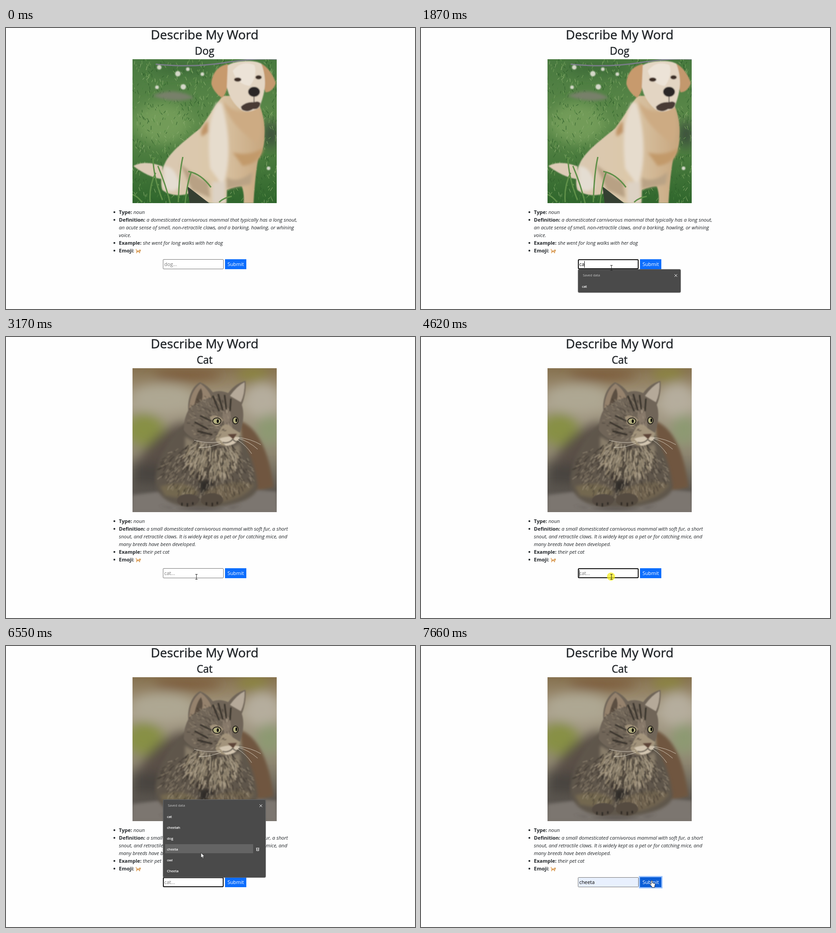
An HTML page that plays this animation: 902 by 621 pixels, repeating every 8000 ms.

```html
<!DOCTYPE html>
<html lang="en">
<head>
<meta charset="utf-8">
<title>Describe My Word</title>
<style>
html,body{margin:0;width:100%;height:100%;overflow:hidden;background:#fefefe}
body{position:relative;font:11.03px/17px "Open Sans","Noto Sans",sans-serif;color:#212529}
h1,h2,ul,.abs,.photo,.panel,.rows,.hover{position:absolute;margin:0}
h1,h2{left:0;width:876px;text-align:center;font-weight:400;white-space:nowrap;-webkit-text-stroke:.5px #212529}
h1{top:-3px;font-size:27.9px;line-height:34px}
h2{top:37px;font-size:22.8px;line-height:27px}
.photo{left:279px;top:69px;width:318px;height:318px}
ul{left:249px;top:398px;padding:0;list-style:none;white-space:nowrap}
li{position:relative}
li::before{content:"";position:absolute;left:-12.5px;top:7px;width:4px;height:4px;border-radius:50%;background:#212529}
.emoji{width:12px;height:12px;vertical-align:-2.5px}

.t{animation:8s step-end infinite}
.dog{animation-name:dog}
.cat{animation-name:cat}
@keyframes dog{0%{opacity:1}39.6%{opacity:0}}
@keyframes cat{0%{opacity:0}39.6%{opacity:1}}

/* form */
.input,.btn{font-size:10.9px}
.input{left:346px;top:511px;width:132px;height:20px;border:1px solid #767676;border-radius:2px;background:#fff;color:#000;overflow:hidden}
.ring{left:346px;top:511px;width:130px;height:18px;border:2px solid #101010;border-radius:3px;animation-name:ring}
@keyframes ring{0%{opacity:0}12.2%{opacity:1}39.6%{opacity:0}57.7%{opacity:1}94.8%{opacity:0}}
.strip{animation-name:type}
.strip div{height:20px;line-height:20px;padding-left:2px;white-space:nowrap}
.strip .hint{color:#757575}
.strip .filled{background:#e8f0fe}
@keyframes type{
  0%{transform:none}20.8%{transform:translateY(-20px)}23.3%{transform:translateY(-40px)}
  26.7%{transform:translateY(-60px)}39.6%{transform:translateY(-80px)}82.7%{transform:translateY(-100px)}
}
.caret{display:inline-block;width:1px;height:15px;margin-right:-1px;vertical-align:-3.5px;background:#111;animation-name:blink}
@keyframes blink{
  0%{opacity:0}12.2%{opacity:1}33.4%{opacity:0}57.7%{opacity:1}64.1%{opacity:0}
  70.8%{opacity:1}77.5%{opacity:0}83.6%{opacity:1}90.2%{opacity:0}
}
.typo{text-decoration:underline wavy #e33 .8px;text-underline-offset:1px;animation-name:typo}
@keyframes typo{0%{text-decoration-color:#e33}94.8%{text-decoration-color:transparent}}
.btn{left:483px;top:511px;width:47px;height:22px;line-height:22px;text-align:center;color:#fff;background:#0d6efd;animation-name:press}
@keyframes press{
  0%{background:#0d6efd;box-shadow:none}
  91.3%{background:#0b5ed7;box-shadow:none}
  94.8%{background:#0b5ed7;box-shadow:0 0 0 2.6px rgba(49,132,253,.5)}
}

/* suggestions */
.panel{left:346px;width:225px;border:1px solid #686868;border-radius:3px;background:#4a4a4a;color:#fff;box-shadow:0 0 2px rgba(0,0,0,.25);opacity:0}
.up{top:339px;height:171px;transform-origin:50% 56%}
.down{top:533px;height:50px;animation-name:down}
.panel small{position:absolute;left:10px;top:4px;font-size:7.4px;color:#c8c8c8}
.panel svg{position:absolute;left:210.5px;top:8.5px;width:8px;height:8px;fill:none;stroke:#eee}
.panel .bin{top:105px;left:204px;opacity:0;animation-name:bin}
.rows{left:8px;top:25px;font-size:7.8px;line-height:24px;white-space:pre-line;-webkit-text-stroke:.2px #fff}
.hover{left:4px;top:98px;width:194px;height:20px;background:rgba(255,255,255,.14);animation-name:hover}
.first{animation-name:first}
.second{animation-name:second}
.all{animation-name:all}
.some{animation-name:some}
@keyframes first{0%{opacity:0}15.8%{opacity:.4}16.7%{opacity:1}23.3%{opacity:0}}
@keyframes all{0%{opacity:1}20.8%{opacity:0}}
@keyframes some{0%{opacity:0}20.8%{opacity:1}}
@keyframes down{0%{opacity:0}23.3%{opacity:1}27.6%{opacity:.66}28.4%{opacity:.34}29.3%{opacity:0}}
@keyframes second{
  0%{opacity:0}58.6%{opacity:.5}59.3%{opacity:1;transform:none;clip-path:none}
  84.4%{opacity:.34;transform:scale(.969);clip-path:inset(48px -2px -2px)}85.3%{opacity:0}
}
@keyframes hover{
  0%{opacity:0;transform:translateY(48px)}77.5%{opacity:1;transform:translateY(48px)}
  79.3%{opacity:1;transform:translateY(24px)}81.8%{opacity:1;transform:none}
}
@keyframes bin{0%{opacity:0}81.8%{opacity:1}}

/* pointer */
.pointer{left:0;top:0;width:1px;height:1px;overflow:visible;animation-name:move}
.arrow{animation-name:arrow}
.beam{animation-name:beam}
.hand{animation-name:hand}
.glow{animation-name:glow}
@keyframes move{
  0%{transform:translate(571px,602px)}
  5.3%{transform:translate(571px,602px);animation-timing-function:steps(4)}
  8.8%{transform:translate(470px,552px);animation-timing-function:steps(4)}
  12.2%{transform:translate(420px,530px)}
  75.8%{transform:translate(422px,519px);animation-timing-function:steps(8)}
  82.7%{transform:translate(431px,448px);animation-timing-function:steps(2)}
  84.4%{transform:translate(431px,466px)}
  85.3%{transform:translate(431px,484px)}
  86.2%{transform:translate(436px,487px);animation-timing-function:steps(7)}
  92.2%{transform:translate(509px,518px)}
}
@keyframes arrow{0%{opacity:0}5.3%{opacity:1}11.3%{opacity:0}31.8%{opacity:1}39.6%{opacity:0}76.7%{opacity:1}91.3%{opacity:0}}
@keyframes beam{0%{opacity:0}11.3%{opacity:1}31.8%{opacity:0}39.6%{opacity:1}76.7%{opacity:0}}
@keyframes hand{0%{opacity:0}91.3%{opacity:1}}
@keyframes glow{0%{opacity:0}15%{opacity:1}18.3%{opacity:0}57.7%{opacity:1}59.3%{opacity:0}82.7%{opacity:1}83.6%{opacity:0}94.2%{opacity:1}95.6%{opacity:0}}
</style>
</head>
<body>
<svg width="0" height="0" class="abs">
  <defs>
    <filter id="soft" x="-30%" y="-30%" width="160%" height="160%"><feGaussianBlur stdDeviation="12"/></filter>
    <filter id="fuzz" x="-20%" y="-20%" width="140%" height="140%"><feGaussianBlur stdDeviation="3"/></filter>
    <filter id="edge"><feGaussianBlur stdDeviation=".8"/></filter>
    <linearGradient id="lawn" x2="0" y2="1"><stop offset="0" stop-color="#48793f"/><stop offset=".45" stop-color="#5d8a4a"/><stop offset="1" stop-color="#2f662c"/></linearGradient>
    <linearGradient id="coat" x1="0" x2="1"><stop offset="0" stop-color="#d9c9b2"/><stop offset=".5" stop-color="#dcc8aa"/><stop offset="1" stop-color="#c7a67e"/></linearGradient>
    <linearGradient id="yard" x2="0" y2="1"><stop offset="0" stop-color="#86714f"/><stop offset=".25" stop-color="#a99f8a"/><stop offset=".6" stop-color="#8d8570"/><stop offset=".85" stop-color="#5b5650"/><stop offset="1" stop-color="#77716b"/></linearGradient>
    <symbol id="pet" viewBox="0 0 14 13"><path d="M2 1Q0 0 0 3Q1 5 2 5.500L1 12H3L4.500 9H8.500L9 12H11L11.500 8Q14 7 13 4V2L11.500 3H10L8.500 2V5H4Q2 4 2 1Z" fill="#e6b172"/><path d="M3 6L4 8M6 5.500V8M10 9L9 11" stroke="#b0713a"/><path d="M10.300 4.500H11M12 4.500H12.600" stroke="#432"/></symbol>
  </defs>
</svg>

<h1>Describe My Word</h1>

<section class="t dog">
  <h2>Dog</h2>
  <svg class="photo" viewBox="279 69 318 318">
    <path fill="url(#lawn)" d="M279 69h318v318H279z"/>
    <g filter="url(#soft)"><ellipse cx="345" cy="210" rx="60" ry="45" fill="#729b58"/><ellipse cx="585" cy="235" rx="16" ry="30" fill="#37493b"/><ellipse cx="390" cy="90" rx="70" ry="12" fill="#3d6b37"/></g>
    <g id="grass" fill="none" opacity=".8"></g>
    <path d="M323 150q45-22 92 4q-40 14-92-4z" fill="#78806b" filter="url(#fuzz)"/>
    <path d="M330 80Q410 88 480 77T597 69" fill="none" stroke="#777c85" stroke-width="3"/>
    <g fill="#d5d8c9" filter="url(#edge)"><circle cx="338" cy="87" r="5"/><circle cx="379" cy="101" r="6"/><circle cx="391" cy="130" r="6"/><circle cx="401" cy="91" r="4"/><circle cx="433" cy="102" r="4"/><circle cx="333" cy="131" r="4"/><circle cx="579" cy="310" r="4"/></g>
    <g filter="url(#edge)">
      <path d="M281 305C300 294 325 298 345 306L345 334C325 332 300 320 281 305Z" fill="#dccbb6"/>
      <path d="M478 150C460 172 442 205 428 222C400 245 362 272 350 300C342 320 340 345 345 358C365 374 400 372 410 360C425 372 440 385 450 387H486L487 358C500 352 515 348 520 350Q526 366 524 387H546C548 350 552 310 556 290C568 270 570 255 570 240C572 215 568 190 556 165L500 150Z" fill="url(#coat)"/>
    </g>
    <g filter="url(#fuzz)">
      <path d="M479 160C505 200 550 180 557 175C566 210 563 240 552 254C520 230 490 205 479 160Z" fill="#cdab83"/>
      <path d="M465 165C445 200 445 260 450 310L478 350C500 290 490 210 475 165Z" fill="#e6dccd"/>
      <path d="M445 205Q425 225 432 240L446 230Z" fill="#c09468"/>
      <path d="M500 275Q535 285 568 265Q560 300 522 305Z" fill="#c29a6b"/>
      <path d="M348 305Q375 305 384 350Q365 370 348 352Z" fill="#e4ddd2"/>
      <path d="M384 300Q420 330 446 340L450 375L410 358Z" fill="#b8a184"/>
      <path d="M487 330Q510 345 544 318L540 345L487 356Z" fill="#b9a385"/>
      <path d="M455 340H484V387H455Z" fill="#ddd2c4"/>
    </g>
    <path d="M400 350L448 387H405Z" fill="#353f32"/>
    <g filter="url(#edge)">
      <path d="M489 80C462 84 453 108 453 124C456 136 466 148 476 154C488 146 489 125 495 86Z" fill="#c79a6d"/>
      <path d="M560 77C578 86 590 104 595 122C590 138 578 143 572 142C566 122 568 98 560 77Z" fill="#c3986d"/>
      <path d="M489 83C500 72 550 69 563 79C570 95 573 118 570 135C568 152 562 166 559 176C545 184 530 188 520 182C505 172 490 150 487 130Z" fill="#e3d5c3"/>
      <path d="M500 95Q520 70 548 82Q555 105 538 128Q510 125 500 95Z" fill="#ece3d7"/>
      <path d="M518 174Q530 162 547 164Q556 160 561 166Q559 181 545 179Q532 188 520 180Z" fill="#493a36"/>
      <ellipse cx="547" cy="141" rx="13" ry="11" fill="#292728"/>
      <path d="M547 151V164" stroke="#3b3030" stroke-width="2"/>
      <ellipse cx="511" cy="114" rx="8" ry="4.500" fill="#3d2e27"/><ellipse cx="557" cy="109" rx="7" ry="4.500" fill="#3d2e27"/>
    </g>
    <path d="M380 385Q382 320 390 285M345 380Q325 330 324 285M452 352Q430 322 402 317M335 305Q352 345 362 387M300 385Q290 372 279 368M395 387Q400 340 408 320M470 385Q480 375 498 372M318 385Q315 350 330 320" fill="none" stroke="#5f9049" stroke-width="3"/>
  </svg>
  <ul>
    <li><b>Type:</b> <i>noun</i></li>
    <li><b>Definition:</b> <i>a domesticated carnivorous mammal that typically has a long snout,<br>an acute sense of smell, non-retractile claws, and a barking, howling, or whining<br>voice.</i></li>
    <li><b>Example:</b> <i>she went for long walks with her dog</i></li>
    <li><b>Emoji:</b> <svg class="emoji"><use href="#pet"/></svg></li>
  </ul>
</section>

<section class="t cat">
  <h2>Cat</h2>
  <svg class="photo" viewBox="279 69 318 318">
    <path fill="url(#yard)" d="M279 69h318v318H279z"/>
    <g filter="url(#soft)">
      <ellipse cx="305" cy="205" rx="42" ry="35" fill="#879045"/><ellipse cx="345" cy="135" rx="70" ry="30" fill="#aea793"/>
      <ellipse cx="565" cy="140" rx="40" ry="38" fill="#b5ad9d"/><ellipse cx="580" cy="205" rx="28" ry="34" fill="#8d9a72"/>
      <ellipse cx="545" cy="82" rx="35" ry="16" fill="#8b8440"/><ellipse cx="400" cy="84" rx="75" ry="11" fill="#7a5938"/>
      <path d="M285 310C290 250 335 205 400 185V340L300 330Z" fill="#5a5046"/>
      <path d="M279 280H345V330H279Z" fill="#484441"/>
    </g>
    <path d="M515 185C560 200 582 265 590 332L535 345Z" fill="#6f573f" filter="url(#fuzz)"/>
    <path d="M279 350Q440 325 597 342V387H279Z" fill="#7c7670" filter="url(#fuzz)"/>
    <path d="M395 190C360 220 338 260 330 310C328 340 345 362 380 372Q430 380 475 374C520 368 555 352 555 330C550 290 540 255 516 220Z" fill="#5f564b" filter="url(#fuzz)"/>
    <g filter="url(#fuzz)">
      <path d="M395 220Q470 265 515 235Q528 280 485 310Q430 320 395 270Z" fill="#877b69"/>
      <path d="M340 330Q400 312 425 345Q400 362 350 350Z" fill="#73674f"/>
      <path d="M435 345Q490 310 548 325Q535 352 480 366Z" fill="#6f6450"/>
      <path d="M425 322Q440 310 460 322L432 350Z" fill="#332e29"/>
      <path d="M335 372Q430 392 520 372L500 378H360Z" fill="#4d4742"/>
    </g>
    <g id="pelt" fill="none" opacity=".5" filter="url(#edge)"></g>
    <g id="ruff" fill="none" opacity=".7" filter="url(#edge)"></g>
    <g filter="url(#edge)">
      <ellipse cx="401" cy="361" rx="24" ry="14" fill="#554c42"/><ellipse cx="454" cy="360" rx="25" ry="15" fill="#554b41"/>
      <path d="M388 366v7M400 367v8M412 365v6M442 365v7M455 366v8M466 364v6" stroke="#27221e" stroke-width="3"/>
      <path d="M402 162C400 140 408 110 428 100Q444 106 456 122Q472 116 490 124Q505 103 528 97C530 115 526 135 520 150C527 170 522 195 516 212C510 232 495 242 478 243C445 238 405 228 392 205Q392 180 402 162Z" fill="#6f6558"/>
      <path d="M404 158Q406 120 429 103Q447 116 453 134Q425 138 404 158Z" fill="#95826d"/>
      <path d="M415 152Q420 125 430 113Q436 125 432 140Z" fill="#5c4f43"/>
      <path d="M494 130Q510 108 526 100Q527 125 518 144Z" fill="#b5a999"/>
      <path d="M476 160Q484 152 494 160L500 205L482 200Z" fill="#87796a"/>
      <path d="M478 195Q490 190 500 202L516 212Q510 238 485 241Q460 236 462 222Z" fill="#a3947c"/>
      <path d="M470 225Q490 217 515 222Q508 240 485 240Z" fill="#d2c5b0"/>
      <path d="M450 176Q465 168 480 184L466 198Q452 196 450 176Z" fill="#a09179"/>
    </g>
    <g id="face" fill="none" opacity=".55" filter="url(#edge)"></g>
    <g filter="url(#edge)" fill="none" stroke="#332d27">
      <path d="M456 130L470 164M468 126L478 162M482 128L486 160M496 136L494 164M428 174L454 186M416 188L446 204M422 208L455 216" stroke-width="3"/>
      <path d="M489 215L509 214L501 226Z" fill="#5d4438" stroke="none"/>
      <path d="M500 226Q492 236 478 233M500 226Q507 234 512 230" stroke-width="1.500"/>
    </g>
    <g stroke="#29251f" stroke-width="2" fill="#b4b080"><ellipse cx="465" cy="186" rx="9" ry="7"/><ellipse cx="506" cy="184.500" rx="6" ry="7.500"/></g>
    <ellipse cx="467" cy="186" rx="2.300" ry="4"/><ellipse cx="508" cy="184" rx="1.800" ry="4"/>
    <path d="M512 224Q535 230 555 248M512 222Q540 225 562 238M510 227Q530 240 542 258M472 232Q440 236 415 228M474 235Q445 246 425 244" fill="none" stroke="#e6dfd0" stroke-width=".8"/>
  </svg>
  <ul>
    <li><b>Type:</b> <i>noun</i></li>
    <li><b>Definition:</b> <i>a small domesticated carnivorous mammal with soft fur, a short<br>snout, and retractile claws. It is widely kept as a pet or for catching mice, and<br>many breeds have been developed.</i></li>
    <li><b>Example:</b> <i>their pet cat</i></li>
    <li><b>Emoji:</b> <svg class="emoji"><use href="#pet"/></svg></li>
  </ul>
</section>

<div class="abs input"><div class="t strip">
  <div class="hint"><span class="t caret"></span>dog...</div>
  <div>c<span class="t caret"></span></div>
  <div>ca<span class="t caret"></span></div>
  <div>cat<span class="t caret"></span></div>
  <div class="hint"><span class="t caret"></span>cat...</div>
  <div class="filled"><span class="t typo">cheeta</span><span class="t caret"></span></div>
</div></div>
<div class="abs t ring"></div>
<div class="abs t btn">Submit</div>

<div class="panel up t first">
  <small>Saved data</small><svg viewBox="0 0 8 8"><path d="M1 1L7 7M7 1L1 7"/></svg>
  <div class="rows t all">cheetah
dog
cheeta
owl
Cheeta
cat</div>
  <div class="rows t some">cheetah
cheeta
Cheeta
cat</div>
</div>
<div class="panel down t">
  <small>Saved data</small><svg viewBox="0 0 8 8"><path d="M1 1L7 7M7 1L1 7"/></svg>
  <div class="rows">cat</div>
</div>
<div class="panel up t second">
  <small>Saved data</small><svg viewBox="0 0 8 8"><path d="M1 1L7 7M7 1L1 7"/></svg>
  <div class="hover t"></div>
  <svg class="bin t" viewBox="0 0 8 8"><path d="M.5 1.500H7.500M1.500 1.500V7.500H6.500V1.500M3 3.500V6M5 3.500V6"/></svg>
  <div class="rows">cat
cheetah
dog
cheeta
owl
Cheeta</div>
</div>

<svg class="abs pointer t">
  <circle class="glow t" cx="-1" cy="-.5" r="9" fill="#f4ec1c" fill-opacity=".75"/>
  <path class="arrow t" d="M0 0V11.300L2.600 9L4.400 13L6.200 12.200L4.500 8.300H8Z" fill="#fff" stroke="#222" stroke-width=".9"/>
  <path class="beam t" d="M-2.500-5.500H2.500M0-5.500V5.500M-2.500 5.500H2.500" fill="none" stroke="#222"/>
  <path class="hand t" d="M-1.300 1Q0-1 1.300 1V5.500L6.500 7Q7.500 7.500 7.300 9.500L6.300 13V15.500H0V13.500L-4 9Q-4 7-2.300 7.600L-1.300 8.500Z" fill="#fff" stroke="#222" stroke-width=".9"/>
</svg>

<script>
// Seeded texture strokes for the two pictures
let seed = 7;
const rnd = (a, b) => a + (b - a) * ((seed = seed * 16807 % 2147483647) / 2147483647);

function strokes(id, n, color, width, place) {
  let d = '';
  for (let i = 0; i < n; i++) {
    const [x, y, dx, dy] = place().map(v => v.toFixed(1));
    d += `M${x} ${y}l${dx} ${dy}`;
  }
  const p = document.createElementNS('http://www.w3.org/2000/svg', 'path');
  p.setAttribute('d', d);
  p.setAttribute('stroke', color);
  p.setAttribute('stroke-width', width);
  document.getElementById(id).append(p);
}

// Hairs inside an ellipse, all pointing away from (ox, oy)
const hair = (cx, cy, rx, ry, ox, oy, long) => () => {
  const a = rnd(0, 2 * Math.PI), r = Math.sqrt(rnd(0, 1));
  const x = cx + rx * r * Math.cos(a), y = cy + ry * r * Math.sin(a);
  const dir = Math.atan2(y - oy, x - ox) + rnd(-.3, .3), len = rnd(long / 2, long);
  return [x, y, len * Math.cos(dir), len * Math.sin(dir)];
};

const blade = () => [rnd(279, 597), rnd(72, 392), rnd(-5, 5), rnd(-9, -3)];
['#2f5f2b', '#76a15c', '#48803c', '#8bad70'].forEach((c, i) => strokes('grass', 420 - i * 70, c, 1.2, blade));

const tabby = ['#2b2621', '#a4957c', '#3a332c', '#b9ac95'];
tabby.forEach((c, i) => {
  strokes('pelt', 190 - i * 30, c, 1.6, hair(442, 295, 102, 62, 460, 190, 12));
  strokes('ruff', 75 - i * 8, c, 2.2, hair(452, 262, 58, 48, 470, 170, 18));
  strokes('face', 70 - i * 12, c, 1.2, hair(450, 180, 46, 48, 494, 205, 8));
});
</script>
</body>
</html>
```
